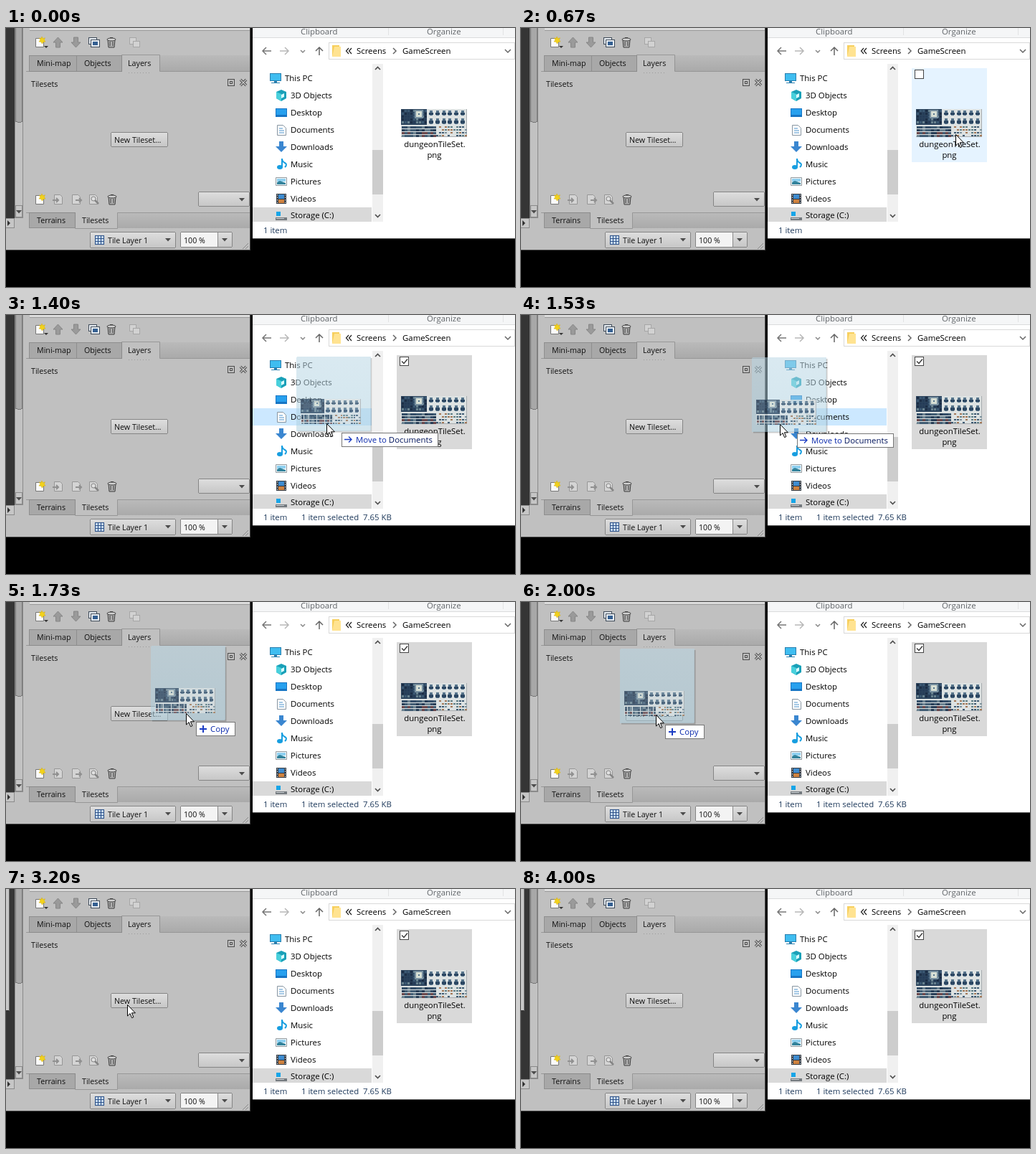
An HTML page that plays this animation: 710 by 361 pixels, repeating every 4540 ms.

```html
<!DOCTYPE html>
<html lang="en">
<head>
<meta charset="utf-8">
<title>Drag a tileset</title>
<style>
  html, body { margin: 0; width: 100%; height: 100%; overflow: hidden; background: #000; }
  svg { display: block; width: 710px; height: 361px; }
  rect { shape-rendering: crispEdges; }
  text { font: 11.4px "Open Sans", "Noto Sans", sans-serif; fill: #000; white-space: pre; }
  .app text { font-size: 10.7px; fill: #101010; }
  .ribbon text { fill: #606468; }
  .status text { fill: #1e395b; }
  .line { fill: none; stroke: #8a8a8a; }
</style>
</head>
<body>
<svg viewBox="0 0 710 361">
  <defs>
    <linearGradient id="button" x2="0" y2="1">
      <stop stop-color="#dedede"/><stop offset="1" stop-color="#c6c6c6"/>
    </linearGradient>
    <linearGradient id="bar" x2="0" y2="1">
      <stop stop-color="#bababa"/><stop offset="1" stop-color="#aaa"/>
    </linearGradient>
    <linearGradient id="glass" x2="0" y2="1">
      <stop stop-color="#b8d6e4"/><stop offset="1" stop-color="#acd0e0"/>
    </linearGradient>
    <g id="thumb"></g>
    <path id="down" d="M-4-2h8l-4 4.5z" fill="#4c4c4c"/>
    <g id="new">
      <path d="M-5.5-5.5h8l3 3v9h-11z" fill="#fafafa" stroke="#777"/>
      <path d="M3-8l1.4 2.7 3-.9-1.2 2.8L8-1 5-.6 3.5 2 2-.8-1-1 .9-3.3-.6-6l2.7.6z" fill="#f2d21b" stroke="#d9b310" stroke-width=".6"/>
    </g>
    <g id="trash" fill="#b0b0b0" stroke="#3c3c3c">
      <path d="M-5-3.5h10l-1 10.500h-8z"/>
      <ellipse cy="-4" rx="6" ry="2" fill="#d0d0d0"/>
      <path d="M-2-1v6M2-1v6M-2-6.500h4" fill="none"/>
    </g>
    <path id="sheet" d="M-5.500-6.500h8l3 3v10h-11z" fill="#d4d4d4" stroke="#969696"/>
  </defs>

  <g class="app">
    <rect width="341" height="310" fill="#484848"/>
    <rect width="340" height="309" fill="#c0c0c0"/>
    <rect width="12" height="265" fill="#353535"/>
    <rect x="12" width="12" height="265" fill="#8a8a8a"/>
    <rect x="13" width="10" height="264" fill="#c2c2c2"/>
    <rect x="13.500" y="-5" width="9" height="136" rx="2" fill="#a8a8a8" stroke="#777"/>
    <rect x="13.500" y="247.500" width="9" height="16" fill="#c6c6c6" stroke="#8a8a8a"/>
    <use href="#down" x="18" y="256"/>
    <rect x="-1" y="265.500" width="12" height="13" fill="#c6c6c6" stroke="#8a8a8a"/>
    <path d="M2 268v8l4-4z" fill="#333"/>
    <rect x="33" width="307" height="3" fill="#dcdcdc"/>
    <rect x="33" y="3" width="307" height="1" fill="#989898"/>

    <use href="#new" x="47" y="20"/>
    <path d="M53 25h6l-3 3z" fill="#333"/>
    <path d="M72.500 13l6.500 7h-3.500v7h-6v-7H66zM97.500 27l6.500-7h-3.500v-7h-6v7H91z" fill="#9a9a9a" stroke="#868686"/>
    <g fill="#e8edf2" stroke="#3f4b59">
      <rect x="115.500" y="13.500" width="11" height="9"/>
      <rect x="118.500" y="16.500" width="12" height="10"/>
      <rect x="121" y="19" width="7" height="5" fill="#345f91" stroke="none"/>
    </g>
    <use href="#trash" x="147" y="20"/>
    <g fill="#d2d2d2" stroke="#a6a6a6">
      <rect x="172.500" y="13.500" width="9" height="9"/><rect x="177.500" y="18.500" width="9" height="8"/>
    </g>

    <rect x="214" y="38" width="126" height="22" fill="url(#bar)"/>
    <rect x="32.500" y="38.500" width="66" height="22" fill="#a8a8a8" stroke="#8e8e8e"/>
    <rect x="98.500" y="38.500" width="63" height="22" fill="#a8a8a8" stroke="#8e8e8e"/>
    <path d="M28 60.500h133.500v-23h53v23H340" class="line" stroke-opacity=".75"/>
    <path d="M171 62.500h30" class="line" stroke-dasharray="1 3" opacity=".7"/>
    <text x="43" y="53">Mini-map</text><text x="109" y="53">Objects</text><text x="170" y="53">Layers</text>
    <text x="35" y="82">Tilesets</text>
    <g fill="none" stroke="#4a4a4a">
      <rect x="309.500" y="71.500" width="9" height="9"/><rect x="312.500" y="74.500" width="3" height="3"/>
      <path d="M327 72l8 8M335 72l-8 8" stroke-width="3.400"/>
      <path d="M327 72l8 8M335 72l-8 8" stroke="#c8c8c8" stroke-width="1.400"/>
    </g>
    <rect x="146.500" y="145.500" width="79" height="20" rx="2" fill="url(#button)" stroke="#858585"/>
    <text x="151" y="160">New Tileset…</text>

    <use href="#new" x="47" y="239"/>
    <use href="#sheet" x="73" y="239"/><use href="#sheet" x="98" y="239"/><use href="#sheet" x="122" y="239"/>
    <path d="M65 240h8m-3-3l3 3-3 3M97 240h8m-3-3l3 3-3 3" fill="none" stroke="#909090" stroke-width="2"/>
    <circle cx="122" cy="238" r="3" fill="#e0e0e0" stroke="#858585"/>
    <path d="M124 240l5 5" stroke="#858585" stroke-width="2.500"/>
    <use href="#trash" x="148" y="239"/>
    <rect x="268.500" y="228.500" width="71" height="20" rx="2" fill="url(#button)" stroke="#858585"/>
    <use href="#down" x="329" y="239"/>

    <rect x="156" y="258" width="184" height="21" fill="url(#bar)"/>
    <rect x="32.500" y="257.500" width="64" height="21" fill="#a8a8a8" stroke="#8e8e8e"/>
    <path d="M28 257.500h68.500v22h59v-22H340" class="line" stroke-opacity=".75"/>
    <text x="43" y="272">Terrains</text><text x="106" y="272">Tilesets</text>
    <rect x="117.500" y="284.500" width="119" height="22" rx="2" fill="url(#button)" stroke="#858585"/>
    <rect x="124" y="289" width="13" height="13" fill="#2d5289"/>
    <path d="M126.500 290v11M130.500 290v11M134.500 290v11" stroke="#c7daf0" stroke-width="3" stroke-dasharray="3 1"/>
    <text x="142" y="300">Tile Layer 1</text>
    <use href="#down" x="226" y="295"/>
    <rect x="243.500" y="284.500" width="72" height="21" rx="2" fill="url(#button)" stroke="#858585"/>
    <rect x="244" y="285" width="51" height="20" fill="#f3f3f3"/>
    <path d="M295.500 285v20" class="line"/>
    <text x="248" y="300">100 %</text>
    <use href="#down" x="305" y="295"/>
    <path d="M330 308l8-8M334 308l4-4" class="line"/>
    <g id="dialog"><rect width="4" height="169" fill="#c8c8c8"/><rect x="4" width="1" height="170" fill="#666"/></g>
  </g>

  <rect x="344" width="366" height="294" fill="#5a5a5a"/>
  <rect x="344" width="366" height="293" fill="#fff"/>
  <g class="ribbon">
    <rect x="344" width="366" height="13" fill="#f5f6f7"/>
    <rect x="344" y="13" width="366" height="1" fill="#dadbdc"/>
    <rect x="533" width="1" height="10" fill="#e2e3e4"/><rect x="693" width="1" height="10" fill="#e2e3e4"/>
    <text x="411" y="9">Clipboard</text><text x="587" y="9">Organize</text>
  </g>
  <g fill="none" stroke-width="1.500">
    <path d="M370 32h-12m5-5l-5 5 5 5" stroke="#777"/>
    <path d="M382 32h12m-5-5l5 5-5 5" stroke="#b8b8b8"/>
    <path d="M411 31l3 3 3-3" stroke="#888"/>
    <path d="M437 38V27m-5 5l5-5 5 5" stroke="#666"/>
    <rect x="450.500" y="20.500" width="259" height="23" stroke="#d9d9d9" stroke-width="1"/>
    <path d="M478 28l-3.500 4 3.500 4M482 28l-3.500 4 3.500 4" stroke="#222" stroke-width="1.200"/>
    <path d="M540 28l4 4-4 4M696 30l4 4 4-4" stroke="#666"/>
  </g>
  <path d="M455 24h10v2h2v14h-12z" fill="#f7cf5d"/><path d="M458 26h9v14h-12z" fill="#ffe391"/>
  <text x="489" y="36">Screens</text><text x="553" y="36">GameScreen</text>

  <rect id="target" x="344" y="130" width="166" height="24" fill="#cce8ff"/>
  <rect x="344" y="250" width="166" height="20" fill="#d9d9d9"/>
  <rect x="511" y="50" width="15" height="220" fill="#f0f0f0"/>
  <rect x="511" y="170" width="15" height="62" fill="#cdcdcd"/>
  <path d="M515 58l3.500-3.500 3.500 3.500M515 260l3.500 3.500 3.500-3.500" fill="none" stroke="#505050" stroke-width="1.700"/>
  <g id="nav"><text x="389" y="74">This PC</text></g>
  <path d="M368 63h16v11h-16zM374 74h4v2h4v1h-12v-1h4z" fill="#2b7fae"/><path d="M369 64h14v9h-14z" fill="#3fbdf0"/>
  <path d="M384 86l7 3v9l-7 4-7-4v-9z" fill="#1aa0b8"/><path d="M377 89l7 3v10l-7-4z" fill="#49d0dc"/><path d="M384 93l4-2v5l-4 2z" fill="#d9fbff"/>
  <path d="M376 112h16v12h-16z" fill="#1775c4"/><path d="M377 113h14v8h-14z" fill="#27a0ee"/>
  <path d="M378.500 135.500h8l4 4v10h-12z" fill="#fff" stroke="#8795a1"/>
  <path d="M381 140h5M381 143h7M381 146h7" stroke="#4a92cc"/>
  <path d="M381 158h6v7h5l-8 8-8-8h5z" fill="#3a86d0"/>
  <path d="M385 182v12" stroke="#179ee0" stroke-width="2"/><ellipse cx="382" cy="194" rx="4" ry="3" fill="#179ee0"/>
  <path d="M385 182q0 4 4 6t0 6" fill="none" stroke="#179ee0" stroke-width="2"/>
  <path d="M376.500 208.500h15v11h-15z" fill="#f7f9fa" stroke="#909aa0"/><path d="M378 210h12v4h-12z" fill="#8fd0f0"/><path d="M378 218v-3l4-2 8 3v2z" fill="#32829b"/>
  <path d="M377 231h14v14h-14z" fill="#333a43"/><path d="M380 232h8v6h-8z" fill="#3e8cd0"/><path d="M380 239h8v5h-8z" fill="#cf823f"/>
  <path d="M378.500 232v13M389.500 232v13" stroke="#dce2e7" stroke-dasharray="1.500 2"/>
  <path d="M376 264h16v4h-16z" fill="#73797e"/><path d="M377 265h11v1h-11z" fill="#c9ced2"/>
  <rect x="377" y="256" width="6" height="6" fill="#16a5e8"/>

  <rect id="tile" x="545.500" y="56.500" width="104" height="130"/>
  <g id="check">
    <rect x="549.500" y="58.500" width="12" height="12" fill="#fff" stroke="#444"/>
    <path id="tick" d="M552 64.500l3 3 5-6" fill="none" stroke="#333" stroke-width="1.300"/>
  </g>
  <use href="#thumb" x="551" y="113"/>
  <text x="598" y="166" text-anchor="middle">dungeonTileSet.</text>
  <text x="597.500" y="181" text-anchor="middle">png</text>
  <g class="status">
    <text x="359" y="286">1 item</text>
    <g id="selected"><text x="412" y="286">1 item selected</text><text x="498" y="286">7.65 KB</text></g>
  </g>

  <g id="ghost">
    <path d="M1 103.500h102.500V1" fill="none" stroke="#000" stroke-width="2" opacity=".2"/>
    <rect x="-1" y="-1" width="104" height="104" rx="2" fill="url(#glass)" opacity=".53"/>
    <use href="#thumb" transform="translate(5 58) scale(.91)" opacity=".75"/>
    <g id="tip">
      <rect id="tipBox" x="62.500" y="105.500" height="19" fill="#fff" stroke="#767676"/>
      <path id="tipIcon" fill="none" stroke="#1b3cc4"/>
      <text x="82" y="118.500" fill="none"><tspan id="tipText" fill="#0b2aac"></tspan><tspan id="tipPlace" fill="#00145c"></tspan></text>
    </g>
  </g>
  <path id="cursor" d="M.5.5v15.500l3.600-3.400 2.500 6 2.300-1-2.500-5.800h5z" fill="#fff" stroke="#000"/>
</svg>
<script>
const LOOP = 4540, STEP = 1000 / 15;
const $ = id => document.getElementById(id);
const show = (id, opacity) => $(id).setAttribute("opacity", +opacity);
const place = (id, [x, y]) => $(id).setAttribute("transform", `translate(${Math.round(x)} ${Math.round(y)})`);

function add(parent, name, attrs, content = "") {
  const node = document.createElementNS("http://www.w3.org/2000/svg", name);
  for (const key in attrs) node.setAttribute(key, attrs[key]);
  node.textContent = content;
  $(parent).append(node);
}

["3D Objects", "Desktop", "Documents", "Downloads", "Music", "Pictures", "Videos", "Storage (C:)"]
  .forEach((label, i) => add("nav", "text", { x: 397, y: 98 + 24 * i - (i === 7) }, label));

// Miniature tile sheet: walls, two rows of figures, floor tiles and small items.
function drawThumb() {
  let seed = 11;
  const random = () => (seed = seed * 16807 % 2147483647) / 2147483647;
  const pick = colors => colors[Math.floor(random() * colors.length)];
  const box = (x, y, width, height, fill) => add("thumb", "rect", { x, y, width, height, fill });
  box(0, 0, 92, 39, "#a9adb0");
  box(0, 0, 91, 38, "#dde2e2");
  box(0, 0, 36, 22, "#2b435c");
  for (let y = 1; y < 21; y += 4)
    for (let x = 1; x < 35; x += 4) box(x, y, 3, 3, pick(["#1c2e46", "#3b5873", "#253c58", "#68828f"]));
  box(19, 1, 12, 12, "#7890a0");
  box(21, 3, 8, 8, "#d7dfd5");
  box(24, 6, 2, 2, "#53738b");
  for (let i = 0; i < 6; i++)
    for (const [y, height] of [[2, 7], [13, 8]]) {
      const x = 39 + i * 8.800;
      box(x + 1, y, 4, height, "#55738a");
      box(x, y + 3, 6, height - 4, "#2c4763");
    }
  for (let y = 24; y < 37; y += 4)
    for (let x = 1; x < 90; x += 4) {
      if (x < 49) box(x, y, 3.500, 3, pick(["#263c55", "#405c73", "#6b8290", y > 30 ? "#6a464a" : "#344e68"]));
      else if (random() < .8) box(x, y, 3, 2, pick(["#3e5a72", "#7d929c", "#a37857", "#5f7f86"]));
    }
}
drawThumb();

// Keys are [step, x, y], joined by straight moves.
const cursorPath = [[2, 634, 245], [5, 622, 185], [9, 614, 148], [12, 589, 147], [17, 589, 147],
  [18, 575, 150], [23, 361, 152], [25, 274, 154], [27, 228, 155], [30, 188, 157], [33, 172, 160],
  [35, 169, 161], [57, 169, 161], [58, 140, 215], [59, 56, 322]];
const ghostPath = [[18, 530, 57], [23, 323, 60], [25, 224, 61], [27, 181, 63], [30, 139, 66],
  [33, 120, 67], [35, 118, 69]];

function along(path, step) {
  const next = path.findIndex(key => key[0] > step);
  if (next < 0) return path.at(-1).slice(1);
  if (next === 0) return path[0].slice(1);
  const [a, b] = [path[next - 1], path[next]];
  const k = (step - a[0]) / (b[0] - a[0]);
  return [1, 2].map(i => a[i] + (b[i] - a[i]) * k);
}

function render(now) {
  const step = Math.floor((now % LOOP + 4) / STEP);
  const cursor = along(cursorPath, step);
  const selected = step >= 15;
  const dragging = step >= 18 && step < 43;
  const hovered = step >= 2 && step < 18 && cursor[1] < 187;
  const overNav = dragging && cursor[0] > 344 && cursor[0] < 511;
  const overApp = dragging && cursor[0] < 340;

  place("cursor", cursor);
  show("cursor", step >= 2 && step < 60);
  place("ghost", along(ghostPath, step));
  show("ghost", dragging && (step === 18 ? .75 : step === 42 ? .5 : 1));
  show("tip", (overNav || overApp) && step < 42);
  $("tipBox").setAttribute("width", overNav ? 134 : 54);
  $("tipIcon").setAttribute("d", overNav ? "M66 114.500h10m-4-4l4 4-4 4" : "M67 115h10M72 110v10");
  $("tipIcon").setAttribute("stroke-width", overNav ? 1.300 : 2);
  $("tipText").textContent = overNav ? "Move to " : "Copy";
  $("tipPlace").textContent = overNav ? "Documents" : "";

  show("target", overNav);
  show("selected", selected);
  show("tile", selected || hovered);
  show("check", selected || hovered);
  show("tick", selected);
  const fill = hovered ? selected ? "#cce8ff" : "#e5f3ff" : "#d9d9d9";
  $("tile").setAttribute("fill", fill);
  $("tile").setAttribute("stroke", hovered && selected ? "#99d1ff" : fill);
  show("dialog", Math.min(1, Math.max(0, (step - 45) / 3)));
}

const start = performance.now();
function tick() {
  render(performance.now() - start);
  requestAnimationFrame(tick);
}
tick();
</script>
</body>
</html>
```
